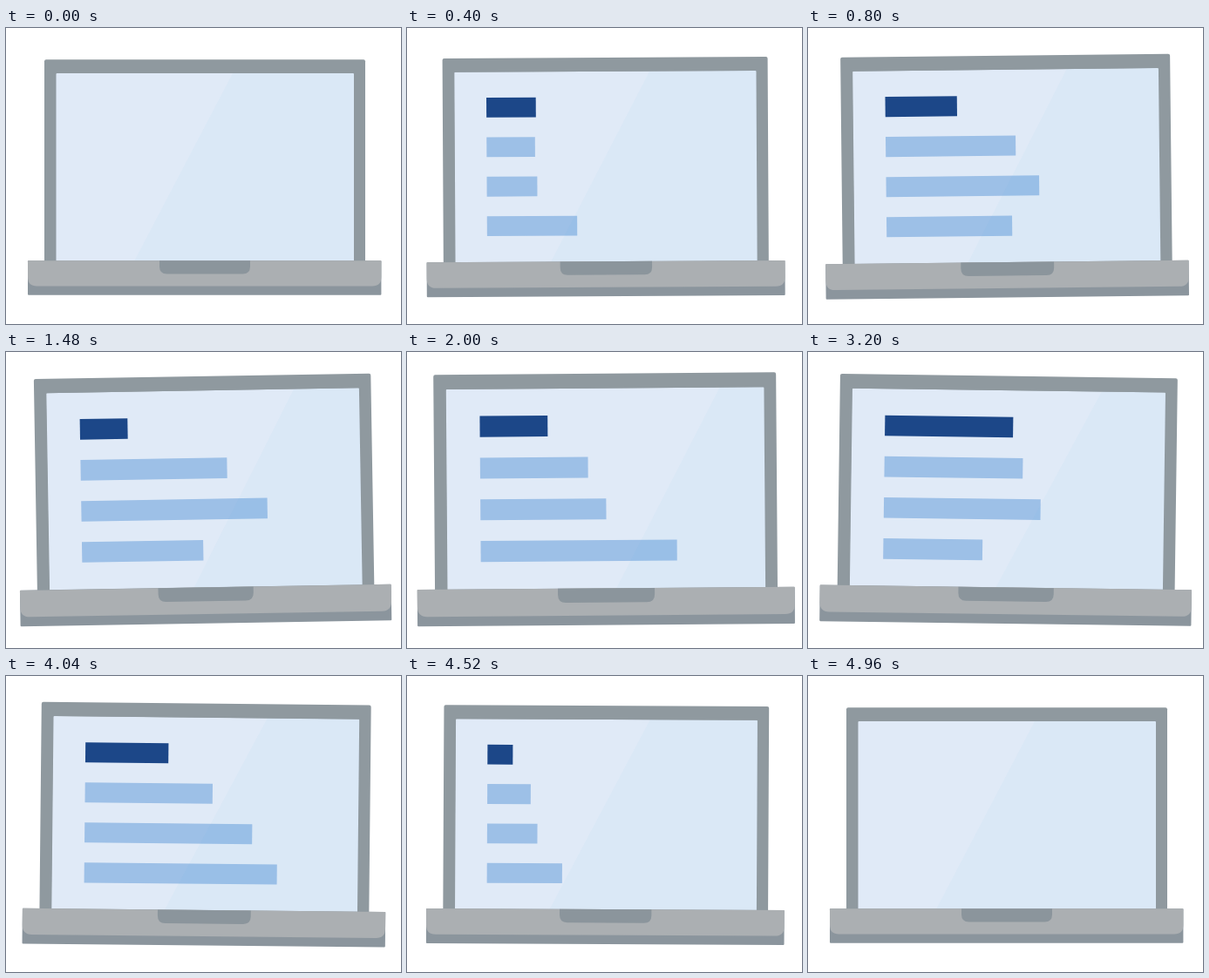
Recreate the animation shown at these times as an HTML page. Size 453 by 340 pixels, loop 5080 ms.

```html
<!DOCTYPE html>
<html>
<head>
<meta charset="utf-8">
<title>Laptop</title>
<style>
  html, body { margin: 0; height: 100%; overflow: hidden; background: #fff; }
  svg { display: block; width: 100%; height: 100%; }
</style>
</head>
<body>
<svg viewBox="0 0 453 340">
  <clipPath id="screen"><rect x="57.5" y="52" width="341.5" height="217" rx="1"/></clipPath>
  <g id="laptop">
    <rect x="44" y="36.3" width="368" height="240" rx="2" fill="#8f999f"/>
    <g clip-path="url(#screen)">
      <rect x="57" y="52" width="343" height="217" fill="#e0eaf7"/>
      <g id="bars"></g>
      <path id="glare" d="M260 52H600V269H146.5Z" fill="rgb(30,150,215)" fill-opacity=".03"/>
    </g>
    <rect x="25" y="267.3" width="405.4" height="39.5" rx="1" fill="#8b959d"/>
    <path d="M25 267.3H430.4V286q0 10.5-10.5 10.5H35.5Q25 296.5 25 286Z" fill="#abafb2"/>
    <path d="M176 267.3H280V274q0 8.5-8.5 8.5H184.5Q176 282.5 176 274Z" fill="#8b959c"/>
  </g>
</svg>
<script>
const LOOP = 5080, END = 4960, STEP = 40;
const PIVOT_X = 227.5, PIVOT_Y = 206;
const { min, max, cos, floor, PI } = Math;

const byId = id => document.getElementById(id);
const laptop = byId('laptop'), glare = byId('glare');

function makeBar(row, fill, mean, swing, period, peak) {
  const rect = document.createElementNS('http://www.w3.org/2000/svg', 'rect');
  const attrs = { x: 93.5, y: 81 + 44.8 * row, height: 22.5, fill };
  for (const name in attrs) rect.setAttribute(name, attrs[name]);
  byId('bars').append(rect);
  return { rect, width: t => mean + swing * cos(2 * PI * (t - peak) / period) };
}

// Each bar's length swings around a mean: mean, swing, period, time of a peak.
const LIGHT = '#9dc0e7';
const bars = [
  makeBar(0, '#1c4788', 96, 44, 3400, 3150),
  makeBar(1, LIGHT, 132, 35, 2330, 3570),
  makeBar(2, LIGHT, 153, 58, 2400, 3680),
  makeBar(3, LIGHT, 162, 55, 1970, 4120)
];

// Steady approach, then steady retreat.
const zoomAt = t => min(t / 29500, (END - t) / 34200);
// Lean left, swing across to the right, settle upright (degrees).
const tiltAt = t => max(-t / 1290, min((t - 2430) / 1000, (END - t) / 1600));
// Bars grow in at the start and shrink away at the end.
const growthAt = t => min(1, t / 800, (END - t) / 920);

function draw(now) {
  const t = min(END, floor(now % LOOP / STEP) * STEP);
  const zoom = zoomAt(t), growth = growthAt(t);
  laptop.setAttribute('transform',
    `translate(${PIVOT_X} ${PIVOT_Y}) rotate(${tiltAt(t)}) scale(${1 + zoom}) translate(${-PIVOT_X} ${-PIVOT_Y})`);
  glare.setAttribute('transform', `translate(${1350 * zoom} 0)`);
  for (const { rect, width } of bars) rect.setAttribute('width', growth * width(t));
}

const start = performance.now();
function tick() {
  draw(performance.now() - start);
  requestAnimationFrame(tick);
}
tick();
</script>
</body>
</html>
```
